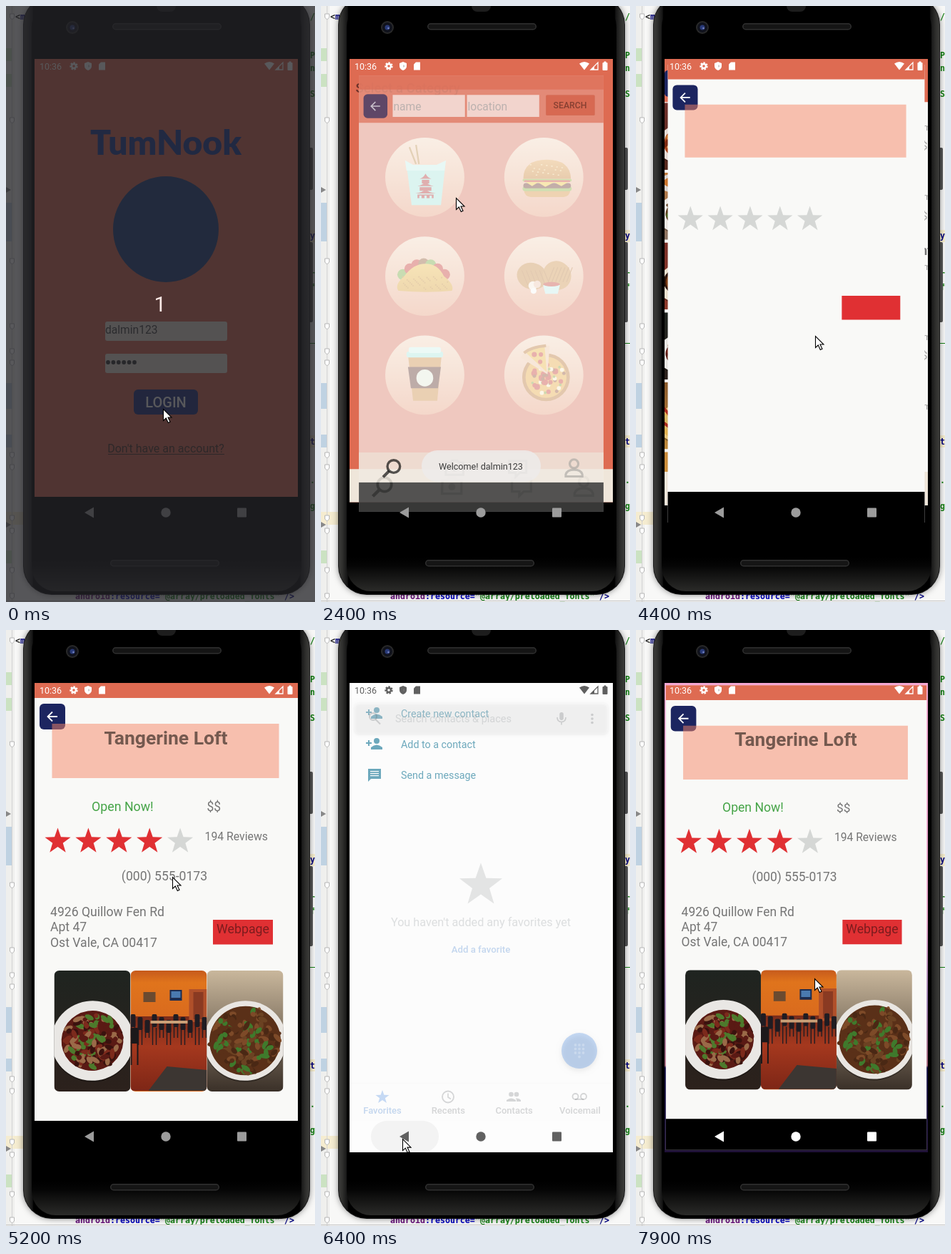
Recreate the animation shown at these times as an HTML page with a canvas. Size 433 by 833 pixels, loop 8000 ms.

```html
<!DOCTYPE html>
<html lang="en">
<head>
<meta charset="utf-8">
<title>Restaurant finder demo</title>
<style>
html, body { margin: 0; width: 100%; height: 100%; overflow: hidden; background: #f3f3f3 }
canvas { display: block }
</style>
</head>
<body>
<canvas id="stage" width="433" height="833"></canvas>
<script>
const c = document.getElementById('stage').getContext('2d');
const ORANGE = '#de6b52', NAVY = '#1c2560', CREAM = '#efe6da', PAPER = '#f9f9f7', GREY = '#757575', RED = '#e03033';
const SANS = 'Roboto, sans-serif', MONO = '"DejaVu Sans Mono", monospace';
const USER = 'dalmin123';
const PLACES = [
  ['Amber Ladle Restaurant', 497, '2.91', '617 Q Pell St', '$$'],
  ['Quiet Oar Chinese Restaurant', 253, '0.79', '2380 Wisp Ave', '$$'],
  ['Copper Finch Chinese Restaurant', 511, '8.72', '5264 Dorna Velisa Blvd', '$'],
  ['Tangerine Loft', 194, '4.97', '4926 Quillow Fen Rd', '$$'],
  ['Plum Kettle', 548, '1.01', '750 W Orl St', '$'],
  ['Brisk Melon', 320, '3.40', '', '']
];
// top and bottom of the background, plate, food colours, food share of the plate
const DISHES = [
  ['#6d2f2a', '#55281c', '#e6dcd6', ['#a8441c', '#c9752c', '#7c2a12', '#d69a58'], .85],
  ['#c07a3c', '#8a7364', '#ece8e4', ['#5c3a1c', '#8a4a20', '#4f6b24', '#b07a3c'], .8],
  ['#7a3028', '#8d3a2b', '#ece2d0', ['#6d3212', '#7a3c14', '#874818'], .8],
  ['#1f2420', '#2c211c', '#e9e7e4', ['#5a1a14', '#7c2a1c', '#4d7a2c', '#3a120e', '#9a6a48'], .8],
  ['#8a5a2d', '#c08a3a', '#e6c47a', ['#e0b050', '#d0a040', '#6fae3a', '#d9b866'], .95],
  ['#c98a3a', '#d9a040', '#f0cf80', ['#e8b040', '#dca030'], .95],
  ['#c9b79c', '#3a3028', '#e9e6e2', ['#5a3018', '#6b4222', '#3f7a2c', '#7d4a28', '#4a2814'], .92]
];
const PATH = [
  [0, 220, 563], [900, 220, 563], [1200, 226, 553], [1400, 226, 553], [1800, 193, 276], [1900, 191, 270],
  [2000, 191, 270], [2100, 189, 268], [2600, 189, 268], [3100, 255, 287], [3200, 272, 376], [3300, 280, 380],
  [3500, 276, 384], [3900, 253, 457], [4100, 251, 461], [4500, 251, 461], [5000, 235, 349], [5200, 233, 345],
  [5400, 233, 345], [5700, 139, 646], [6000, 116, 705], [6200, 113, 716], [6300, 114, 711], [7400, 114, 712],
  [7900, 250, 487], [8000, 250, 487]
];
let T = 0;

const clamp = v => Math.max(0, Math.min(1, v));
const ramp = (a, b) => clamp((T - a) / (b - a));
function box(x, y, w, h, fill, r = 0) {
  c.beginPath(); c.roundRect(x, y, w, h, r); c.fillStyle = fill; c.fill();
}
function oval(x, y, rx, ry, fill, a = 0) {
  c.beginPath(); c.ellipse(x, y, rx, ry, a, 0, 7); c.fillStyle = fill; c.fill();
}
const disc = (x, y, r, fill) => oval(x, y, r, r, fill);
function ring(x, y, r, color, width) {
  c.beginPath(); c.arc(x, y, r, 0, 7); c.strokeStyle = color; c.lineWidth = width; c.stroke();
}
function shape(d, fill, stroke, width = 1) {
  const p = new Path2D(d);
  if (fill) { c.fillStyle = fill; c.fill(p); }
  if (stroke) { c.strokeStyle = stroke; c.lineWidth = width; c.stroke(p); }
}
function at(x, y, draw) { c.save(); c.translate(x, y); draw(); c.restore(); }
function text(s, x, y, size, color, align = 'left', weight = 400, font = SANS) {
  c.font = `${weight} ${size}px ${font}`; c.textAlign = align; c.fillStyle = color; c.fillText(s, x, y);
}
function star(x, y, r, fill) {
  c.beginPath();
  for (let i = 0; i < 10; i++) {
    const a = i * Math.PI / 5, q = i % 2 ? r * .4 : r;
    c.lineTo(x + q * Math.sin(a), y - q * Math.cos(a));
  }
  c.fillStyle = fill; c.fill();
}
function fade(stops, x0, y0, x1, y1) {
  const g = c.createLinearGradient(x0, y0, x1, y1);
  stops.forEach(([p, k]) => g.addColorStop(p, k));
  return g;
}
function random(seed) { return () => (seed = seed * 16807 % 2147483647) / 2147483647; }

function photo(x, y, w, h, draw) {
  c.save();
  c.beginPath(); c.roundRect(x, y, w, h, 7); c.clip();
  c.translate(x, y);
  draw(w, h);
  c.restore();
}
function dish(n) {
  const [top, bottom, plate, foods, share] = DISHES[n], rnd = random(n * 7919 + 8000);
  return (w, h) => {
    const cx = w * .5, cy = h * .58, rx = w * .54, ry = h * .33;
    box(0, 0, w, h, fade([[0, top], [1, bottom]], 0, 0, 0, h));
    if (n == 0) for (const gx of [18, 62]) { box(gx, 4, 13, 24, '#a86a60', 6); box(gx + 5, 24, 3, 14, '#c9a8a0'); }
    if (n == 1) { oval(24, 14, 26, 13, '#d9d4d0'); oval(24, 13, 18, 8, '#c9742c'); oval(80, 16, 18, 12, '#d9d4d0'); }
    oval(cx, cy + 2, rx, ry, 'rgba(0,0,0,.3)', -.15);
    oval(cx, cy, rx, ry, plate, -.15);
    oval(cx, cy, rx * share * .94, ry * share * .94, foods[0], -.15);
    if (n == 2) { oval(cx, cy, rx * .8, ry * .8, '#2d150b'); oval(cx, cy + 1, rx * .74, ry * .72, foods[1]); }
    const size = n == 2 ? .025 : .045;
    for (let i = 0; i < 150; i++) {
      const a = rnd() * 6.3, q = Math.sqrt(rnd()) * share * .88;
      oval(cx + q * rx * Math.cos(a), cy + q * ry * Math.sin(a), w * size * (.6 + rnd()), w * size * .7, foods[i % foods.length], rnd() * 3);
    }
    if (n == 4) {
      disc(66, 62, 17, '#6fae3a'); disc(62, 66, 10, '#9cc860');
      shape('M0 28l34 38M0 50l30 22', null, '#a82a1e', 4);
    }
  };
}
function diningRoom(w, h) {
  box(0, 0, w, h, fade([[0, '#c65a1c'], [.1, '#e0741c'], [.4, '#d96a1e']], 0, 0, 0, h));
  box(0, 64, w, 104, fade([[0, '#7a2c1a'], [.4, '#a5381e'], [1, '#7d2616']], 0, 64, 0, h));
  box(82, 26, 25, 46, '#b0502a'); box(88, 30, 14, 38, '#8a3a22');
  box(18, 30, 17, 14, '#6a4a30'); box(55, 27, 17, 15, '#1c2c50'); box(57, 29, 13, 9, '#4a7ab0');
  for (let i = 0; i < 11; i++) {
    box(i * 10, 61 + i % 3 * 4, 7, 18, '#201c22', 2);
    shape(`M${i * 10 + 1} 78v${16 + i % 2 * 10}m5 0v-24`, null, '#201c22', 1.4);
  }
  box(28, 70, 52, 4, '#c9a078'); box(0, 80, 11, 22, '#1c181a', 2);
  shape('M1 100v32M10 100v32', null, '#1c181a', 2);
  shape('M25 168l26-34 56 5v29z', '#3c3632');
}

function editor() {
  box(0, 0, 433, 833, '#efefed');
  box(12, 0, 421, 833, '#f8f8f7');
  [[59, 18, '#cbe2c2'], [95, 18, '#cbe2c2'], [275, 54, '#bfd2e2'], [527, 36, '#bfd2e2'], [599, 18, '#bfd2e2'], [761, 18, '#cbe2c2']]
    .forEach(([y, h, k]) => box(0, y, 8, h, k));
  box(0, 707, 26, 18, '#f5ecd0');
  box(8, 0, 1, 833, '#d2d2d2');
  for (const y of [15, 160, 357, 448, 483, 499, 628, 645, 716, 734, 789, 825])
    shape(`M5.500 ${y - 4}h6v5l-3 3 -3 -3z`, '#fff', '#b5b5b5');
  for (const y of [257, 725]) shape(`M0 ${y - 4}l7 4 -7 4z`, '#888');
  const code = (s, x, y, k) => text(s, x, y, 11.6, k, 'left', 700, MONO);
  code('<', 13, 19, '#222'); code('m', 20, 19, '#000080');
  box(426, 313, 7, 17, '#f8efcf'); box(426, 600, 7, 17, '#f8efcf');
  [['/', 19], ['P', 73], ['n', 91], ['S', 127], ['r', 379], ['f', 397], ['.', 667], ['g', 703]]
    .forEach(([s, y]) => code(s, 426, y, '#138013'));
  code('y', 426, 325, '#000080'); code('t', 426, 613, '#000080');
  box(426, 471, 7, 1, '#138013');
  code('android', 97, 829, '#660e7a'); code(':resource=', 146, 829, '#0000c0');
  code('"@array/preloaded_fonts"', 216, 829, '#138013'); code('/>', 390, 829, '#000080');
  box(0, 831, 433, 1, '#c4c4c4');
}
function phone() {
  box(424, 198, 6, 59, '#555', 2); box(424, 330, 6, 112, '#555', 2);
  c.save();
  c.shadowColor = 'rgba(0,0,0,.45)'; c.shadowBlur = 9;
  box(24, -14, 402, 837, '#161616', 40);
  c.restore();
  box(25, -13, 400, 835, fade([[0, '#3c3c3a'], [.012, '#30302e'], [.03, '#141414'], [.034, '#000'], [.966, '#000'], [.97, '#141414'], [.988, '#30302e'], [1, '#3c3c3a']], 25, 0, 425, 0), 39);
  box(36, -5, 378, 823, fade([[0, '#000'], [.25, '#050505'], [1, '#2b2b29']], 0, 770, 0, 818), 34);
  box(211, -8, 27, 16, '#1d1d1d', 8);
  for (const [x, y] of [[149, 24], [146, 774]]) {
    box(x, y, 153, 9.5, '#303030', 5); box(x + 1.5, y + 1.5, 150, 6.5, '#151515', 3);
  }
  disc(93, 30, 9, '#292929'); disc(93, 30, 7, '#10121c'); disc(93, 30, 3.5, '#293a78'); disc(94.5, 31, 1.3, '#7685c0');
}
function statusBar(k) {
  text('10:36', 47, 89, 12.5, k);
  c.save(); c.setLineDash([2.4, 1.8]); ring(95, 84, 4.7, k, 2); c.restore();
  ring(95, 84, 3, k, 2.4);
  shape('M115 78l5 2v4q0 4-5 6q-5-2-5-6v-4z', k); shape('M115 82v4l3-2z', '#8886');
  shape('M133 78.500h6v11h-9v-8z', k);
  shape('M362 80.500q7-5 14 0l-7 9z', k);
  shape('M388 79v10h-10z', null, k, 1.3); shape('M383 84v5h-5z', k);
  box(394.500, 79, 7, 11, k, 1); box(396.500, 77.500, 3, 2, k);
}
function navKeys(k) {
  shape('M110 708l13-7.500v15z', k); disc(224, 708, 6.7, k); box(324, 701.500, 13, 13, k, 1);
}
function base(bg, bar, nav) {
  box(40, 74, 369, 656, bg); box(40, 74, 369, 21, bar); box(40, 686, 369, 44, nav);
}
function backButton(y) {
  box(47, y, 36, 36, NAVY, 6);
  shape(`M72 ${y + 18}H59 M65 ${y + 11.5}l-6.500 6.500 6.500 6.500`, null, '#fff', 1.8);
}
function tabs() {
  const k = '#aaa7a2';
  box(40, 641, 369, 45, CREAM);
  ring(92.500, 662, 9.5, '#000', 3.6);
  shape('M85.500 669l-9 9', null, '#000', 4.4);
  shape('M171.500 656h6l3-3h8l3 3h6v18.500h-26.500z', null, k, 3.2);
  disc(184.500, 665, 4.8, k);
  shape('M266.500 653.500h26v18h-10l-6 6v-6h-10z', null, k, 3.2);
  ring(364.500, 658, 6.5, k, 3.4);
  shape('M352 677v-3q2-7 12.500-7t12.500 7v3z', null, k, 3.4);
}

function login() {
  base(ORANGE, ORANGE, '#000');
  text('TumNook', 224, 208, 48, '#1b3a98', 'center', 900, 'Lato, sans-serif');
  disc(224, 312, 74, '#1d3f80');
  box(139, 441, 171, 27, CREAM, 3); box(139, 486, 171, 27, CREAM, 3);
  text(USER, 139, 458, 15.6, '#444');
  for (let i = 0; i < 6; i++) disc(143 + i * 7.4, 498, 2.9, '#333');
  box(179, 536, 90, 35, '#1c3080', 6);
  text('LOGIN', 224, 561, 20, '#fff', 'center', 500);
  text("Don't have an account?", 224, 624, 16, '#4d332d', 'center');
  box(143, 626, 163, 1, '#4d332d');
}

const snacks = [
  () => { // noodle box
    shape('M-12-18l-9-23M-8-18l-4-26', null, '#b8843b', 2.2);
    shape('M-25-17H28l-6 55h-40z', '#a6ece4'); shape('M-27-23l11 6h32l13-6-2 14h-52z', '#c9f7f1');
    for (let i = 0; i < 3; i++) {
      const y = 2 + i * 10, w = 8 + i * 3;
      shape(`M${1 - w} ${y}q${w - 3}-1 ${w}-7q3 6 ${w} 7z`, '#b01f24'); box(4 - w, y + 1.5, 2 * w - 6, 5, '#b01f24');
    }
    for (let i = -1; i < 2; i++) box(i * 7 - .5, 25, 3, 5, '#a6ece4');
  },
  () => { // burger
    box(-27, 9, 63, 18, '#d98a2b', 9); box(-29, 12, 67, 7, '#7fae2c', 4);
    box(-28, 8, 65, 7, '#5b1d12', 4); shape('M-27 5h63l-12 7-10-5-12 6-10-6-8 5z', '#f6c92f');
    box(-29, 2, 67, 4, '#86b52c', 2); box(-27, 4, 63, 2.5, '#cc2a20', 1);
    shape('M-28 2q0-26 32-26t33 26z', fade([[0, '#e9a24a'], [1, '#c9761f']], 0, -24, 0, 2));
    for (let i = 0; i < 18; i++) oval(-18 + i * 19 % 45, -17 + i * 7 % 15, 1.3, .8, '#f9d58d');
  },
  () => { // taco
    for (let i = 0; i < 7; i++) disc(-30 + i * 9.5, 4 - 21 * Math.sin((i + .7) / 7.4 * Math.PI), 7.5, ['#69a52d', '#c9241c', '#c9241c', '#8a4a1c'][i % 4]);
    shape('M-36 20q-6-8 8-20q12-17 29-17t25 17q15 12 11 20q-33 3-73 0z', fade([[0, '#f4bd3c'], [1, '#dd9a22']], 0, -18, 0, 20));
    for (let i = 0; i < 40; i++) disc(-30 + i * 23 % 62, 1 + i * 11 % 18, 1, '#c07c18');
  },
  () => { // nuggets and dip
    oval(-16, 0, 21, 18, '#c98136', .3); oval(18, -1, 19, 20, '#d08a3c', -.6);
    for (let i = 0; i < 6; i++) shape(`M${-30 + i * 6}-8l8 20M${6 + i * 5} 8l8-20`, null, '#b36d28', 1);
    disc(-15, 13, 6, '#fff0e4'); disc(-9, 11, 5, '#f3c9b0'); disc(-14, 20, 4, '#fff');
    shape('M-1 12h23l-3 12h-17z', '#c5f5f2'); oval(10.500, 11, 11.500, 3, '#c52f22');
  },
  () => { // coffee
    shape('M-23-28h46l-6 63h-33z', '#cf812f'); shape('M-23-11h45l-4 29h-37z', '#4a1710');
    box(-25, -32, 50, 8, '#a9eee6', 3); box(-22, -38, 44, 8, '#d5fbf5', 3); disc(0, 4, 11.500, '#e9f0df');
  },
  () => { // pizza
    const topping = [['#c9261e', 4], ['#fff0cc', 2.8], ['#c9261e', 3], ['#8a3a1a', 2.4], ['#7a9e2c', 1.8]];
    disc(3, 3, 32.500, '#b8691f'); disc(3, 3, 28, '#eda52e');
    for (let i = 0; i < 45; i++) {
      const q = 3 + i * 7 % 23, [k, r] = topping[i % 5];
      disc(3 + q * Math.cos(i * 2.4), 3 + q * Math.sin(i * 2.4), r, k);
    }
    shape('M5-1L-32-24Q-20-42 8-40z', '#f4c6a0'); shape('M4-4l-29-27q9-7 26-9z', '#f1b433');
    shape('M-27-30q9-8 30-10', null, '#b8691f', 4); disc(-13, -28, 3.500, '#c9261e'); disc(-4, -28, 3, '#c9261e'); disc(-5, -18, 3, '#c9261e');
  }
];
function category() {
  base(ORANGE, ORANGE, '#000');
  text('Select a Category', 53, 128, 18.1, '#6b3129', 'left', 500);
  snacks.forEach((draw, i) => at(i % 2 ? 310 : 147.5, 243.5 + (i >> 1) * 134.7, () => {
    disc(0, 0, 54, fade([[0, '#fbdcc2'], [1, '#ec9874']], 0, -54, 0, 54));
    draw();
  }));
  tabs();
}

function list() {
  base(PAPER, ORANGE, '#000');
  c.save();
  c.beginPath(); c.rect(40, 74, 369, 568); c.clip();
  if (T >= 2800) PLACES.forEach(([name, reviews, miles, street, price], i) => {
    const y = 146 + i * 93.7;
    if (T >= 2900) photo(40, y, 90, 90, dish(i));
    text(name, 137, y + 17, 18, '#737373', 'left', 700);
    for (let s = 0; s < 5; s++) star(144 + s * 14.3, y + 34, 6.8, s < 4 ? '#d9292e' : '#d4d6d4');
    text(reviews + ' Reviews', 214, y + 36, 12.9, '#9c9c9c');
    text(miles + ' mi', 409, y + 37, 12.9, '#9c9c9c', 'right');
    text(street, 137, y + 58, 12.9, '#666');
    text(price, 409, y + 62, 14, '#9c9c9c', 'right');
    text('Chinese', 137, y + 79, 12.9, '#9c9c9c');
  });
  c.restore();
  box(40, 74, 369, 71, ORANGE);
  backButton(102);
  box(91, 103, 109, 33, '#fbfbfa'); box(203, 103, 109, 33, '#fbfbfa');
  text('name', 92, 126, 16.8, '#a0a0a0'); text('location', 204, 126, 16.8, '#a0a0a0');
  box(322, 103, 74, 31, '#cd5f48', 2); box(323, 104, 72, 29, '#d9684f', 1);
  text('SEARCH', 358.500, 123, 13.2, '#5e2a22', 'center', 500);
  tabs();
}

function detail() {
  const ready = T >= 4700;
  base(PAPER, ORANGE, '#000');
  backButton(103);
  box(64.500, 131, 318, 76, 'rgba(245,133,103,.5)');
  for (let i = 0; i < 5; i++) star(72.500 + i * 42.9, 295.5, 19, ready && i < 4 ? RED : '#d5d7d5');
  box(290, 405, 84, 34.500, RED);
  if (!ready) return;
  text('Tangerine Loft', 224, 160, 26.5, '#74594f', 'center', 700);
  text('Open Now!', 120, 253, 17.8, '#45a447');
  text('$$', 281.500, 253, 17.5, GREY);
  text('194 Reviews', 278.500, 293.5, 15.8, GREY);
  text('(000) 555-0173', 222, 350, 17.6, GREY, 'center');
  ['4926 Quillow Fen Rd', 'Apt 47', 'Ost Vale, CA 00417'].forEach((s, i) => text(s, 62, 400 + i * 21.3, 17.6, GREY));
  text('Webpage', 332, 424, 17.8, '#7d1c1e', 'center');
  if (T < 4900) return;
  [dish(3), diningRoom, dish(6)].forEach((draw, i) => photo(67.5 + i * 107, 476, 107, 169, draw));
}

function personAdd(x, y, k) {
  disc(x + 3, y - 4, 4, k); shape(`M${x - 5} ${y + 8}v-3q8-7 16 0v3z M${x - 9} ${y - 5}h2v3h3v2h-3v3h-2v-3h-3v-2h3z`, k);
}
function contacts() {
  const k = '#3b8ba5';
  base('#fafafa', '#fafafa', '#fafafa');
  c.save();
  c.globalAlpha *= .2 + .8 * ramp(5700, 6000);
  personAdd(75, 116, k); personAdd(75, 159, k);
  shape('M66 194h18v14h-14l-4 4z', k);
  for (let i = 0; i < 3; i++) box(69, 197 + i * 3, 12, 1.2, '#fafafa');
  ['Create new contact', 'Add to a contact', 'Send a message'].forEach((s, i) => text(s, 112, 121.500 + i * 43.3, 14.3, k));
  c.restore();
}

function favorites() {
  const k = '#5f6368', blue = '#1b69c9';
  base('#fdfdfd', '#fdfdfd', '#fdfdfd');
  c.save();
  c.shadowColor = 'rgba(0,0,0,.3)'; c.shadowBlur = 4; c.shadowOffsetY = 1;
  box(47, 102, 355, 43, '#fff', 6);
  c.shadowBlur = 7; c.shadowOffsetY = 3;
  disc(362, 588, 25, '#2574e0');
  c.restore();
  ring(73, 121, 5, k, 2); shape('M76.500 125l6.500 6.500', null, k, 2);
  text('Search contacts & places', 104, 129, 14.5, '#80868b');
  box(334.300, 115, 5.500, 11, k, 3);
  shape('M331 122q0 6.500 6 6.500t6-6.500 M337 128.500v4', null, k, 1.6);
  for (let i = -1; i < 2; i++) disc(380, 124 + i * 5.5, 1.8, k);
  star(224, 357, 31.500, '#979a9c');
  text("You haven't added any favorites yet", 224, 414, 16.2, '#80868b', 'center');
  text('Add a favorite', 224, 451, 13.2, blue, 'center', 500);
  for (let i = 0; i < 10; i++) disc(i == 9 ? 362 : 356.500 + i % 3 * 5.5, 580 + (i / 3 | 0) * 5.5, 1.9, '#fff');
  box(40, 633, 369, 1, '#ededed');
  star(86, 653, 10, '#1f6fdc');
  ring(178, 652.500, 8, k, 1.8);
  shape('M178 647.500v5.500l4 2.500', null, k, 1.6);
  disc(266.500, 649, 3.3, k); disc(274, 649, 3.3, k);
  shape('M260 659v-2q6.500-5 13 0v2z M274 659v-2l-1-2.500q5-.500 7 2.500v2z', k);
  ring(356.500, 652, 4, k, 1.8); ring(368, 652, 4, k, 1.8);
  box(356, 655, 12, 1.8, k);
  ['Favorites', 'Recents', 'Contacts', 'Voicemail'].forEach((s, i) => text(s, 86 + i * 92.3, 676, 13, i ? k : blue, 'center', 500));
}
function dialer() {
  const a = ramp(6300, 6700);
  if (a < 1) contacts();
  view(favorites, 1, a);
  if (T >= 6300 && T < 6500 || T >= 7000 && T < 7500) box(70, 686, 95, 44, '#f3f3f3', 22);
}

function view(draw, scale = 1, alpha = 1, dx = 0) {
  if (alpha <= 0) return;
  c.save();
  c.globalAlpha *= alpha;
  c.translate(224.5 + dx, 402); c.scale(scale, scale); c.translate(-224.5, -402);
  draw();
  c.restore();
}
function open(from, to, start) {
  const p = 1 - (1 - ramp(start - 100, start + 300)) ** 2.6;
  if (p < 1) view(from, 1 + .05 * p);
  view(to, .85 + .15 * p, clamp(p * 1.25));
}
function switchTask(from, to, start, dur, dx) {
  const left = (1 - ramp(start, start + dur)) ** 2, k = ramp(start - 100, start + 200);
  box(40, 74, 369, 656, fade([[0, '#f4a7d3'], [.5, '#eaa6cc'], [.68, '#9c7fb4'], [.815, '#a8647c'], [.82, '#141048'], [1, '#201238']], 0, 74, 0, 730));
  view(from, 1 - .08 * k, 1 - k);
  view(to, 1 - .12 * left, ramp(start, start + 200), dx * left);
}
function toast() {
  c.save();
  c.globalAlpha = ramp(1000, 1200) * (1 - ramp(3400, 3900));
  box(141, 621, 167, 44, 'rgba(238,236,234,.86)', 22);
  text('Welcome! ' + USER, 224, 648, 12.6, '#3c3c3c', 'center');
  c.restore();
}
function screen() {
  c.save();
  c.beginPath(); c.rect(40, 74, 369, 656); c.clip();
  if (T < 1000) login();
  else if (T < 2400) open(login, category, 1000);
  else if (T < 4300) open(category, list, 2400);
  else if (T < 5400) open(list, detail, 4300);
  else if (T < 6000) switchTask(detail, dialer, 5400, 600, 10);
  else if (T < 7400) dialer();
  else switchTask(dialer, detail, 7400, 700, 0);
  toast();
  statusBar(T >= 5800 && T < 7500 ? '#606060' : '#fff');
  navKeys(T < 5400 ? '#9c9c9c' : T < 5800 ? '#8f8f8f' : T < 7500 ? '#616161' : '#fff');
  c.restore();
}
function countdown() {
  c.save();
  c.globalAlpha = T < 100 ? 1 : T < 400 ? .9 : clamp((700 - T) / 400);
  box(0, 0, 433, 833, 'rgba(36,36,40,.76)');
  text('1', 216, 427, 30, '#fbe9e6', 'center');
  c.restore();
}
function cursor() {
  const i = PATH.findIndex(p => p[0] > T), [t0, x0, y0] = PATH[i - 1], [t1, x1, y1] = PATH[i], u = (T - t0) / (t1 - t0);
  at(x0 + (x1 - x0) * u, y0 + (y1 - y0) * u, () =>
    shape('M.500 .500V16.500L4.300 13l3 6.500 2.700-1.200-3-6.300h5z', '#fff', '#000', 1.1));
}

let shown = -1;
function frame(now) {
  T = Math.floor(now % 8000 / 100) * 100;
  if (T != shown) {
    shown = T;
    editor(); phone(); screen();
    if (T < 700) countdown();
    cursor();
  }
  requestAnimationFrame(frame);
}
frame(0);
</script>
</body>
</html>
```
